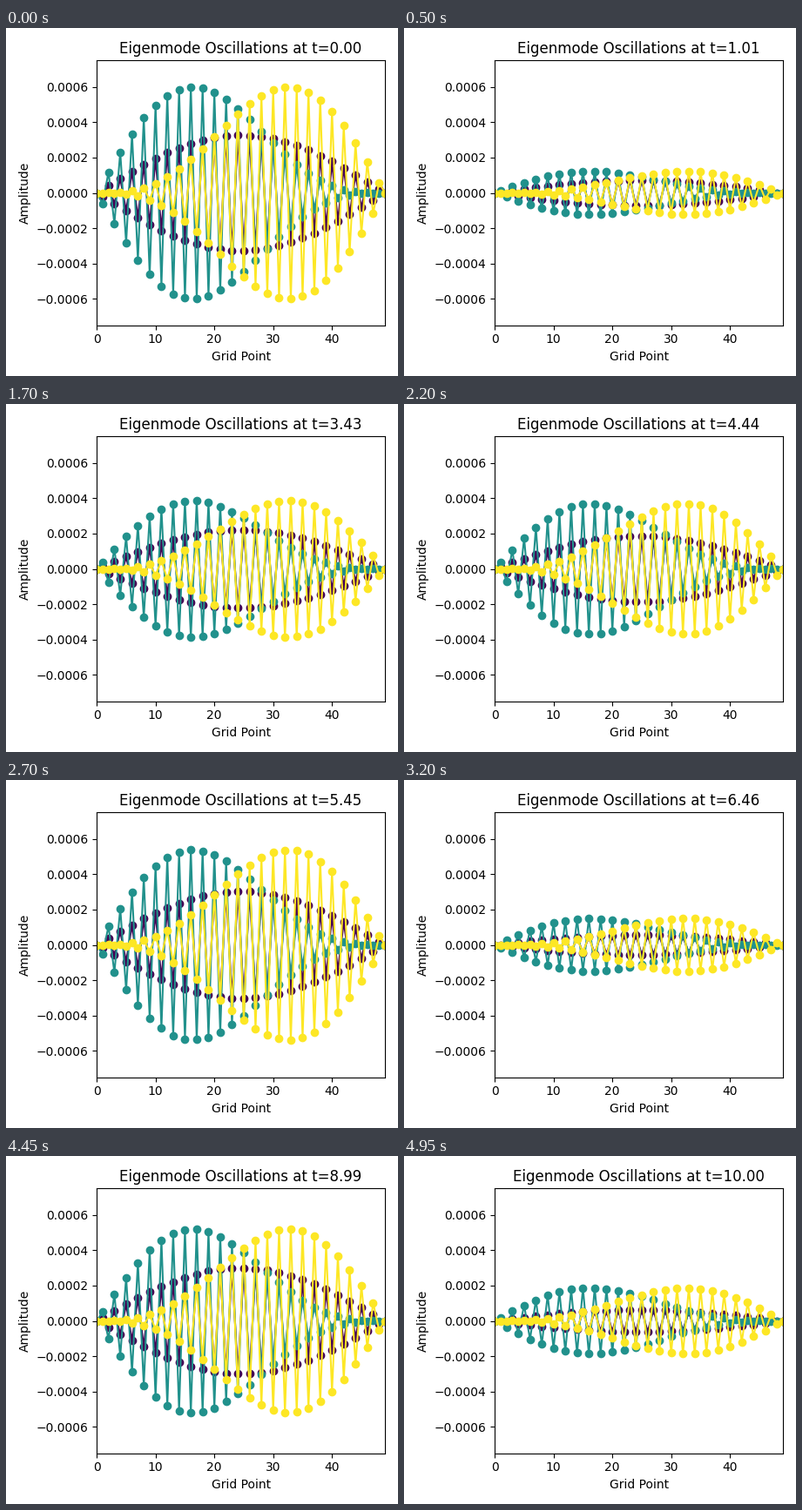
Recreate the animation shown at these times as a matplotlib script. Size 450 px wide and 400 px high, loop 5 s.

```python
import numpy as np
import matplotlib.pyplot as plt
from matplotlib.animation import FuncAnimation

FRAMES = 100
SPAN = 49                       # grid points run from 0 to SPAN
times = np.linspace(0, 10, FRAMES)

# Highest modes of the square-grid Laplacian, seen along the row next to the edge
x = np.arange(SPAN + 1)
step = np.pi / SPAN
theta = step * x
amp = 0.125 * (2 / SPAN) * np.sin(step)
base = amp * (-1.0) ** x * np.sin(theta)


def eigenvalue(p, q):
    return 4 * np.cos(p * step / 2) ** 2 + 4 * np.cos(q * step / 2) ** 2


single, paired = eigenvalue(1, 1), eigenvalue(1, 2)
modes = [
    (base, single),
    (np.sqrt(2) * base * (np.cos(step) + np.cos(theta)), paired),
    (np.sqrt(2) * base * (np.cos(step) - np.cos(theta)), paired),
]

plt.rcParams["font.family"] = "DejaVu Sans"
fig, ax = plt.subplots(figsize=(4.5, 4), dpi=100)
colors = plt.cm.viridis(np.linspace(0, 1, len(modes)))
lines = [ax.plot(x, shape, "o-", color=c)[0]
         for (shape, _), c in zip(modes, colors)]
ax.set_xlim(0, SPAN)
ax.set_ylim(-0.00075, 0.00075)
ax.set_xlabel("Grid Point")
ax.set_ylabel("Amplitude")
title = ax.set_title("Eigenmode Oscillations at t=0.00")
fig.tight_layout()


def update(i):
    t = times[i]
    for line, (shape, lam) in zip(lines, modes):
        line.set_ydata(shape * np.cos(lam * t))
    title.set_text(f"Eigenmode Oscillations at t={t:.2f}")
    return [*lines, title]


anim = FuncAnimation(fig, update, frames=FRAMES, interval=50,
                     repeat=True, repeat_delay=0, blit=False)
plt.show()
```
